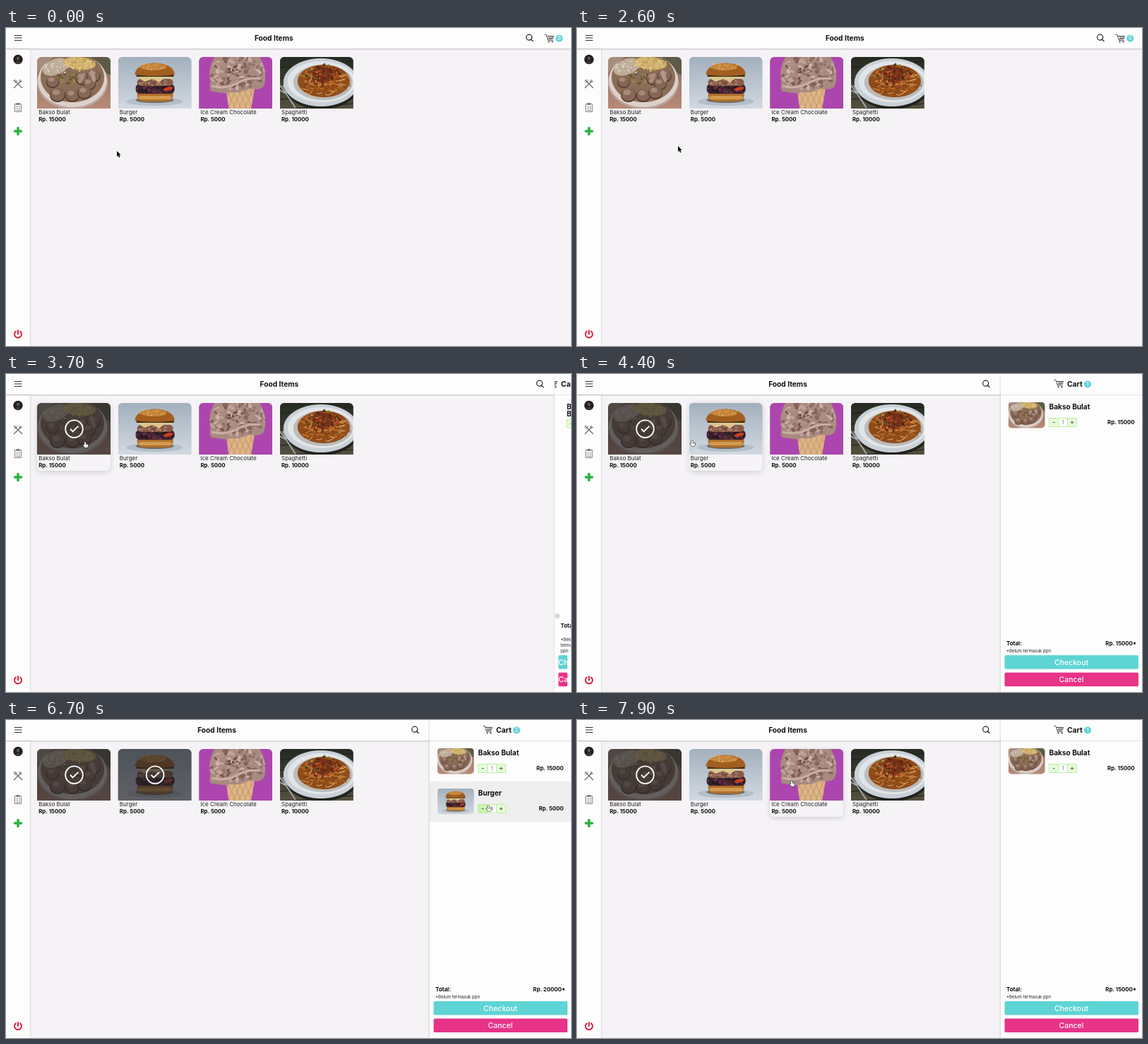
An HTML page with a canvas that plays this animation: 800x450 px, repeating every 8000 ms.

```html
<!DOCTYPE html>
<html lang="en">
<head>
<meta charset="utf-8">
<title>Food Items</title>
<style>
html, body { margin: 0; width: 100%; height: 100%; overflow: hidden; background: #f5f3f6; }
canvas { display: block; width: 800px; height: 450px; }
</style>
</head>
<body>
<canvas id="stage" width="800" height="450"></canvas>
<script>
const stage = document.getElementById('stage');
let g = stage.getContext('2d');
const LOOP = 8000, STEP = 100, PW = 104, PH = 73;
const ADD_BAKSO = 3500, OPEN = 3615, ADD_BURGER = 4700, REMOVE_BURGER = 6800;

// ---------- drawing helpers ----------
function rect(x, y, w, h, color) { g.fillStyle = color; g.fillRect(x, y, w, h); }
function oval(x, y, rx, ry, color, turn = 0) {
  g.fillStyle = color;
  g.beginPath();
  g.ellipse(x, y, rx, ry, turn, 0, 7);
  g.fill();
}
function shape(d, color) { g.fillStyle = color; g.fill(new Path2D(d)); }
function line(d, color, width = 1) {
  g.strokeStyle = color;
  g.lineWidth = width;
  g.stroke(new Path2D(d));
}
function rounded(x, y, w, h, r) { g.beginPath(); g.roundRect(x, y, w, h, r); }
function text(s, x, y, size, weight = 400, color = '#111', align = 'left') {
  g.font = `${weight} ${size}px Inter, "Open Sans", sans-serif`;
  g.textAlign = align;
  g.textBaseline = 'alphabetic';
  g.fillStyle = color;
  g.fillText(s, x, y);
}
function at(x, y, draw) { g.save(); g.translate(x, y); draw(); g.restore(); }
function gradient(top, bottom) {
  const s = g.createLinearGradient(0, 0, 0, PH);
  s.addColorStop(0, top);
  s.addColorStop(1, bottom);
  return s;
}

// ---------- food pictures ----------
let seed = 1;
function rnd() { seed = seed * 16807 % 2147483647; return seed / 2147483647; }
function specks(n, x, y, rx, ry, size, colors) {
  for (let i = 0; i < n; i++) {
    const a = rnd() * 6.283, r = Math.sqrt(rnd());
    oval(x + Math.cos(a) * r * rx, y + Math.sin(a) * r * ry, size * (0.5 + rnd()),
      size * (0.3 + rnd() * 0.5), colors[i % colors.length], rnd() * 3);
  }
}

function bakso() {
  rect(0, 0, PW, PH, gradient('#8e7060', '#b98a78'));
  shape('M0 0H24L0 22Z', '#a58c7c');
  shape('M76 0H104V26Q88 18 76 0Z', '#5d5a45');
  oval(50, 36, 50, 38, '#b8a39b');
  oval(50, 33, 49, 38, '#ddd0c9');
  oval(50, 29, 45, 35, '#8a6d57');
  oval(26, 14, 19, 11, '#bfae9b', -0.4);
  oval(60, 9, 23, 9, '#cfb06d', 0.1);
  specks(70, 60, 10, 23, 9, 1.8, ['#e3cb8b', '#b99650', '#d8bd78']);
  specks(40, 27, 15, 18, 10, 1.6, ['#dfd4c5', '#b4a28d']);
  specks(35, 44, 31, 18, 8, 2.2, ['#4e5a2c', '#a58a4d', '#6d482f', '#8e7a40']);
  for (const [x, y, r] of [[22, 35, 8], [64, 30, 9], [80, 26, 9], [74, 38, 8], [29, 53, 10], [50, 54, 9], [67, 50, 9]]) {
    oval(x, y + 1, r + 1, r, '#523c2e');
    oval(x, y, r, r * 0.92, '#866657');
    oval(x - 2, y - 3, r * 0.55, r * 0.4, '#a78978');
  }
  oval(79, 27, 3, 9, '#b5968a', -0.3);
  oval(63, 30, 3, 8, '#ad8c7d', 0.5);
}

function burger() {
  rect(0, 0, PW, PH, gradient('#a3b1be', '#d2d9e1'));
  oval(52, 63, 40, 6, '#b3bec8');
  oval(52, 61, 27, 4, '#6f6a68');
  rounded(27, 49, 51, 14, [3, 3, 9, 9]);
  g.fillStyle = '#b0702a';
  g.fill();
  rounded(29, 55, 47, 5, 4);
  g.fillStyle = '#d39a50';
  g.fill();
  rounded(25, 38, 55, 14, 6);
  g.fillStyle = '#35202a';
  g.fill();
  specks(50, 52, 46, 26, 6, 2.2, ['#5b2a42', '#1f161c', '#74304a', '#45322a']);
  oval(71, 45, 7, 2.5, '#c93f25', -0.2);
  rounded(27, 31, 51, 10, 5);
  g.fillStyle = '#865a49';
  g.fill();
  specks(40, 52, 36, 23, 4, 1.8, ['#a87762', '#6b4336', '#c4917b']);
  shape('M25 27L80 26 76 31 66 30 58 36 49 31 38 35 31 31Z', '#dcc68c');
  rect(26, 24, 53, 4, '#38301f');
  shape('M24 25C24 3 80 3 80 25Q52 29 24 25Z', '#a25e1e');
  oval(50, 14, 19, 5, '#c58138');
  specks(45, 51, 13, 22, 5, 0.9, ['#edc885', '#d6a055']);
}

function iceCream() {
  rect(0, 0, PW, PH, '#ac46ae');
  const cone = 'M38 43H79L74 73H42Z';
  shape(cone, '#dcb588');
  g.save();
  g.clip(new Path2D(cone));
  for (let i = 0; i < 9; i++) {
    line(`M${22 + i * 8} 42l14 32M${38 + i * 8} 42l-14 32`, '#c09060', 0.8);
  }
  g.restore();
  const scoop = 'M22 0H86C95 14 96 34 91 42 84 49 76 43 68 46 60 50 52 51 44 50 34 53 26 49 18 49 13 44 17 39 16 34 14 22 16 10 22 0Z';
  shape(scoop, '#a98a80');
  g.save();
  g.clip(new Path2D(scoop));
  specks(110, 54, 22, 40, 24, 4, ['#c2a398', '#94736a', '#b09085', '#cdb2a8', '#86645c']);
  specks(14, 48, 24, 30, 20, 2.6, ['#6c4a44', '#7d584f']);
  line('M18 41Q38 46 54 37T87 31', '#cbaea5', 3);
  g.restore();
}

function spaghetti() {
  rect(0, 0, PW, PH, gradient('#252a22', '#55503f'));
  for (let i = 0; i < 6; i++) line(`M0 ${i * 15}L104 ${i * 15 - 9}`, '#1c1e19', 1);
  oval(59, 40, 53, 34, '#22221f');
  oval(58, 36, 53, 34, '#c9d0d6');
  oval(59, 35, 48, 29, '#e2e5e8');
  oval(61, 36, 42, 25, '#bcbcbb');
  oval(62, 34, 37, 23, '#8f4c1a');
  for (let i = 0; i < 110; i++) {
    const a = rnd() * 6.283, r = Math.sqrt(rnd());
    line(`M${56 + Math.cos(a) * r * 33} ${35 + Math.sin(a) * r * 21}q${rnd() * 8} ${7 - rnd() * 14} ${13 - rnd() * 5} ${rnd() * 8 - 4}`,
      ['#dc9a4a', '#c37627', '#7d3d16', '#e5b36a', '#a85a1e'][i % 5], 1);
  }
  oval(60, 25, 20, 11, '#74301a');
  specks(110, 60, 26, 25, 15, 2, ['#963e1c', '#552012', '#b85724', '#6d2c14', '#c9743a']);
  specks(18, 60, 25, 24, 16, 1.5, ['#6c8a34', '#3f5c1e']);
  line('M0 40L9 52 22 72M0 47L9 52M4 40L10 51', '#a9adae', 1.8);
}

function picture(draw) {
  const c = document.createElement('canvas'), main = g;
  c.width = PW * 2;
  c.height = PH * 2;
  g = c.getContext('2d');
  g.scale(2, 2);
  draw();
  g = main;
  return c;
}

const foods = [
  ['Bakso Bulat', 15000, bakso], ['Burger', 5000, burger],
  ['Ice Cream Chocolate', 5000, iceCream], ['Spaghetti', 10000, spaghetti]
].map(([name, price, draw], i) => ({ name, price, pic: picture(draw), x: 44 + i * 114.6 }));

function photo(pic, x, y, w, h, radii) {
  g.save();
  rounded(x, y, w, h, radii);
  g.clip();
  g.imageSmoothingQuality = 'high';
  g.drawImage(pic, x, y, w, h);
  g.restore();
}

// ---------- motion ----------
const path = [
  [0, 157, 174], [2200, 157, 174], [2300, 143, 167], [2700, 143, 167], [3200, 112, 96],
  [4200, 112, 96], [4600, 214, 92], [5000, 214, 92], [5500, 645, 109], [5800, 650, 111],
  [6300, 683, 121], [6900, 683, 121], [7800, 304, 86], [LOOP, 304, 86]
];
const clamp = v => Math.min(1, Math.max(0, v));
const smooth = v => v * v * (3 - 2 * v);
function pointer(t) {
  const i = path.findIndex(p => p[0] > t);
  const [t0, x0, y0] = path[i - 1], [t1, x1, y1] = path[i];
  const k = smooth((t - t0) / (t1 - t0));
  return { x: x0 + (x1 - x0) * k, y: y0 + (y1 - y0) * k };
}
const panelWidth = t => 200 * smooth(clamp((t - OPEN) / 400));

// ---------- interface ----------
function cartIcon(x, y) {
  at(x, y, () => {
    line('M0 .5H2.5L5 8.5H12M3 2.5H13L11.5 6.5H4.5M6 2.5L7 6.5M8.5 2.5V6.5M11 2.5L10 6.5', '#444', 0.9);
    oval(6, 10.5, 1.1, 1.1, '#333');
    oval(11, 10.5, 1.1, 1.1, '#333');
  });
}
function badge(n, x, y) {
  oval(x, y, 5, 5, '#5fd3d6');
  text(n, x, y + 2.6, 7, 500, '#fff', 'center');
}
function sidebar() {
  g.save();
  g.shadowColor = 'rgba(0,0,0,.2)';
  g.shadowBlur = 3;
  rect(0, 30, 34, 420, '#fefdfe');
  g.restore();
  oval(17, 44.5, 6.7, 6.7, '#22201f');
  oval(17, 43, 2, 2.5, '#66574e');
  shape('M13 49Q17 44 21 49Q17 52 13 49Z', '#3c3836');
  at(17, 79, () => {
    line('M-5 -5L6 6M4.5 -4.5L-6 6', '#666', 1.2);
    line('M-6.5 -3.5L-3.5 -6.5M-5.5 -1.5Q-1.5 -1.5 -1.5 -5.5M3 -6.5L2 -2.5 6 -3.5', '#666', 0.9);
  });
  at(17, 112.5, () => {
    line('M-4.5 -5H4.5V6H-4.5ZM-2 -6H2V-4H-2ZM-2.5 -1H0M1 -1H3M-2.5 1.5H0M1 1.5H3M-2.5 4H3', '#666', 0.8);
  });
  g.lineCap = 'round';
  line('M17 141.5V150.5M12.5 146H21.5', '#2cb33f', 3.6);
  line('M14 429.3A5 5 0 1 0 20 429.3M17 428V433', '#d9203a', 2);
  g.lineCap = 'butt';
}
function header(right, titleX, searchX) {
  g.save();
  g.shadowColor = 'rgba(0,0,0,.22)';
  g.shadowBlur = 2;
  g.shadowOffsetY = 0.5;
  rect(0, 0, right, 29, '#fefdfe');
  g.restore();
  line('M12 10.5H22.5M12 14H22.5M12 17.5H22.5', '#333', 1.1);
  text('Food Items', titleX, 18.3, 10.2, 700, '#111', 'center');
  at(searchX, 14, () => line('M3.2 -.8A4 4 0 1 1 -4.8 -.8A4 4 0 1 1 3.2 -.8M2 2.2L5 5', '#222', 1.2));
}
function card({ name, price, pic, x }, hover, checked) {
  if (hover) {
    g.save();
    g.shadowColor = 'rgba(0,0,0,.15)';
    g.shadowBlur = 7;
    g.shadowOffsetY = 2;
    rounded(x, 41, PW, 96, 6);
    g.fillStyle = '#f6f4f7';
    g.fill();
    g.restore();
  }
  photo(pic, x, 41, PW, PH, [6, 6, 0, 0]);
  if (checked) {
    rounded(x, 41, PW, PH, [6, 6, 0, 0]);
    g.fillStyle = 'rgba(36,36,38,.66)';
    g.fill();
    at(x + 52.5, 77.7, () => {
      line('M12.3 0A12.3 12.3 0 1 1 -12.3 0A12.3 12.3 0 1 1 12.3 0M-5.5 0L-2 3.8 5.8 -3.8', '#fff', 1.9);
    });
  }
  text(name, x + 2.2, 121.8, 8, 400, '#222');
  text('Rp. ' + price, x + 2.2, 132, 7.8, 700);
}
function cartRow({ name, price, pic }, y, x, w, hover, minusHover) {
  const left = x + Math.min(68.5, w - 6), picW = Math.min(52, w - 26);
  if (hover) rect(x, y, w, 57, '#f0eff0');
  if (picW > 2) photo(pic, x + 10.5, y + 9.5, picW, 37, 5);
  if (w > 140) text(name, left, y + 19.8, 10.1, 700);
  else name.split(' ').forEach((s, i) => text(s, left, y + 19.8 + i * 10.5, 10.1, 700));
  const top = y + (w > 140 ? 32.5 : 34);
  ['-', '1', '+'].forEach((s, i) => {
    const cx = left + i * 13;
    rect(cx, top, 13, 12, i === 1 ? '#fff' : i === 0 && minusHover ? '#c8f5ac' : '#e8fcdb');
    g.strokeStyle = '#b4ee98';
    g.lineWidth = 0.9;
    g.strokeRect(cx, top, 13, 12);
    text(s, cx + 6.5, top + 8.8, i === 1 ? 7 : 9, i === 1 ? 400 : 600, i === 1 ? '#777' : '#4a5a42', 'center');
  });
  if (w > 140) text('Rp. ' + price, 789.5, y + 41, 7.8, 700, '#111', 'right');
}
function button(label, x, y, w, color) {
  g.save();
  rounded(x + 5.5, y, Math.max(0, w - 10.5), 19.5, 1.5);
  g.fillStyle = color;
  g.fill();
  g.clip();
  const fits = w > 65;
  text(label, fits ? x + w / 2 : x + 5.5, y + 13.5, 10.5, 500, '#fff', fits ? 'center' : 'left');
  g.restore();
}
function cartPanel(items, w, p) {
  const x = 800 - w, wide = w > 110;
  g.save();
  g.shadowColor = 'rgba(0,0,0,.25)';
  g.shadowBlur = 3;
  rect(x, 0, w, 450, '#fefdfe');
  g.restore();
  g.save();
  g.beginPath();
  g.rect(x, 0, w, 450);
  g.clip();
  rect(x, 29, w, 1, '#e6e4e6');
  const mid = x + w / 2 + (wide ? 0 : 3.5);
  cartIcon(mid - 24.5, 8);
  text('Cart', mid - 6, 18.3, 10.3, 700);
  badge(items.length, mid + 23, 14.5);
  items.forEach((item, i) => {
    const y = 30 + i * 57, over = p.x > x && p.y >= y && p.y < y + 57;
    cartRow(item, y, x, w, over, over && p.x > 668 && p.x < 684 && p.y > 119);
  });
  if (wide) {
    const total = items.reduce((sum, f) => sum + f.price, 0);
    text('Total:', x + 8, 383.5, 7.9, 700);
    text(`Rp. ${total}*`, 792, 383.5, 7.8, 700, '#111', 'right');
    text('*Belum termasuk ppn', x + 8, 394.3, 6.1, 400, '#222');
  } else {
    oval(x + 4, 342.5, 3.6, 3.6, '#d6d5d6');
    text('Total:', x + 8.5, 359, 7.9, 700);
    ['*Belum', 'termasuk', 'ppn'].forEach((s, i) => text(s, x + 8.5, 377.5 + i * 8.4, 6.1, 400, '#222'));
  }
  button('Checkout', x, 398, w, '#5fd4d4');
  button('Cancel', x, 422.5, w, '#e73388');
  g.restore();
}
function cursor({ x, y }, hand) {
  at(x, y, () => {
    if (hand) g.scale(0.88, 0.88);
    const d = hand
      ? 'M-1 .8Q0 -.6 1 .8V3.2L4.6 4.2Q5.2 6.5 3.6 9H-.4L-3.2 5.4Q-2.6 4 -1 5.2Z'
      : 'M0 0V8L1.8 6.4 3.1 9.4 4.5 8.8 3.2 5.9H5.6Z';
    line(d, hand ? '#222' : '#fff', hand ? 1.3 : 1);
    shape(d, hand ? '#fff' : '#000');
    if (hand) line('M1 3.4V5.6M2.8 4V5.8', '#333', 0.6);
  });
}

function render(t) {
  const p = pointer(t), w = panelWidth(t), open = w > 0;
  const hasBurger = t >= ADD_BURGER && t < REMOVE_BURGER;
  const picked = foods.filter((f, i) => i === 0 ? t >= ADD_BAKSO : i === 1 && hasBurger);
  const overCard = f => p.x >= f.x && p.x < f.x + PW && p.y >= 41 && p.y < 137;

  rect(0, 0, 800, 450, '#f5f3f6');
  sidebar();
  foods.forEach(f => card(f, overCard(f), picked.includes(f)));
  header(800, open ? (800 - w) / 2 - 1.5 : 379.3, open ? 779.5 - w : 741.5);
  if (open) cartPanel(picked, w, p);
  else {
    cartIcon(762.5, 9);
    badge(picked.length, 783.3, 14.8);
  }
  const overQty = p.x > 668 && p.x < 708 && p.y > 119 && p.y < 133 && hasBurger;
  cursor(p, foods.some(overCard) || overQty);
}

function frame() {
  render(Math.floor(performance.now() % LOOP / STEP) * STEP);
  requestAnimationFrame(frame);
}
frame();
</script>
</body>
</html>
```
